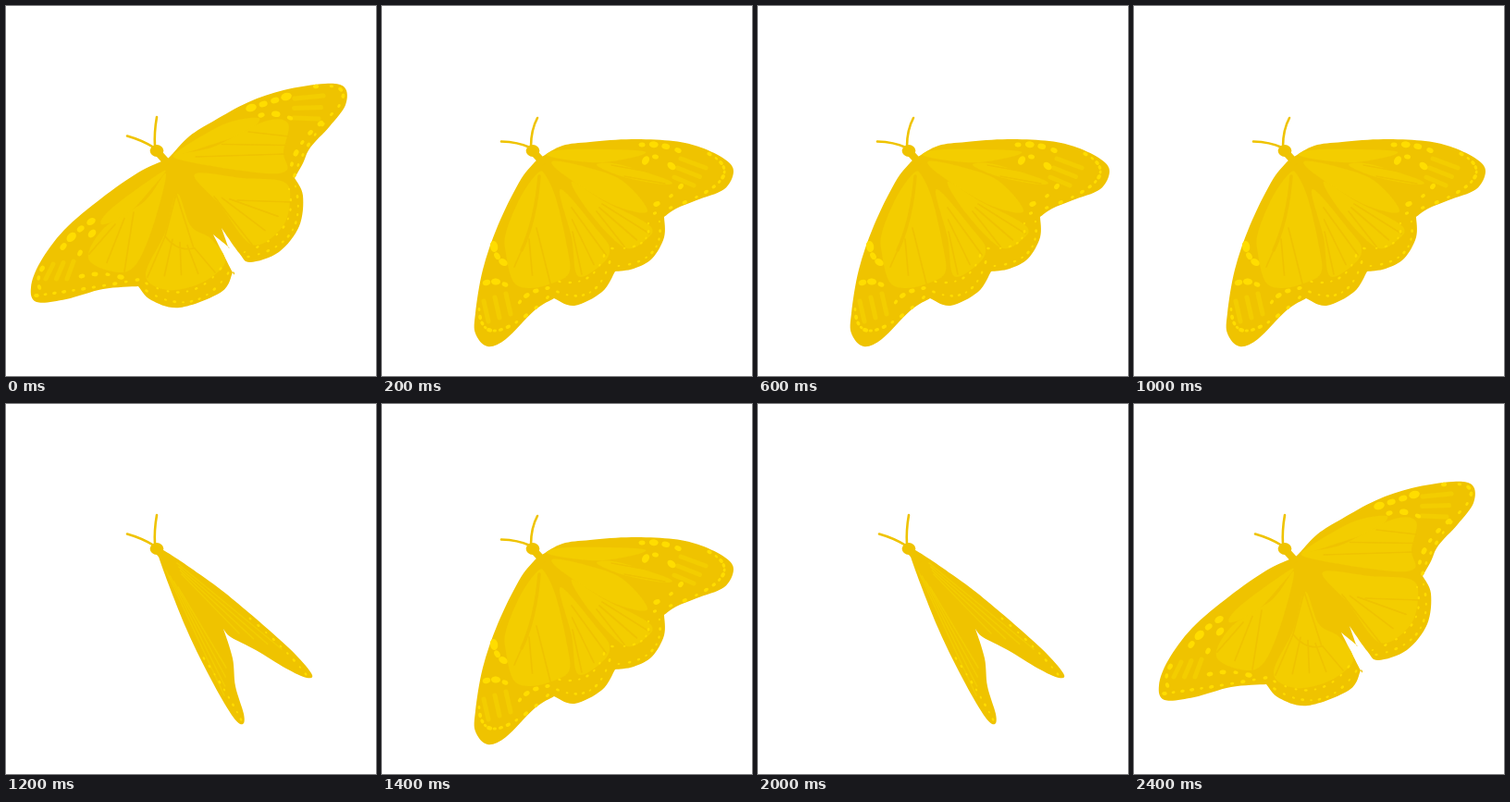
Write an HTML page with a canvas that moves like this. It is 400 by 400 pixels and loops after 2.6 s.

```html
<!DOCTYPE html>
<html lang="en">
<head>
<meta charset="utf-8">
<title>Butterfly</title>
<style>
html, body { margin: 0; width: 100%; height: 100%; overflow: hidden; background: #fff; }
canvas { display: block; width: 400px; height: 400px; }
</style>
</head>
<body>
<canvas id="stage" width="400" height="400"></canvas>
<script>
const ctx = document.getElementById('stage').getContext('2d');
const BASE = '#efc300', CELL = '#f3cd00', SPOT = '#ffdd00';

const points = s => s.trim().split(/\s+/).map(p => p.split(',').map(Number));
const mix = (a, b, t) => [a[0] + (b[0] - a[0]) * t, a[1] + (b[1] - a[1]) * t];

// Smooth closed curve through the points; a doubled point makes a corner.
function blob(s, color = CELL) {
  const p = points(s), n = p.length, at = i => p[(i + n) % n];
  ctx.beginPath();
  ctx.moveTo(...p[0]);
  for (let i = 0; i < n; i++) {
    const [a, b, c, d] = [at(i - 1), at(i), at(i + 1), at(i + 2)];
    ctx.bezierCurveTo(b[0] + (c[0] - a[0]) / 6, b[1] + (c[1] - a[1]) / 6,
      c[0] - (d[0] - b[0]) / 6, c[1] - (d[1] - b[1]) / 6, ...c);
  }
  ctx.fillStyle = color;
  ctx.fill();
}

function stroke(d, width, color = BASE) {
  ctx.strokeStyle = color;
  ctx.lineWidth = width;
  ctx.lineCap = 'round';
  ctx.stroke(new Path2D(d));
}

function oval(x, y, rx, ry, turn, color) {
  ctx.beginPath();
  ctx.ellipse(x, y, rx, ry, turn, 0, 7);
  ctx.fillStyle = color;
  ctx.fill();
}

// n spots of slightly varied size along a curve: start, control, end.
function spots(s, n, r) {
  const [a, b, c] = points(s);
  for (let i = 0; i < n; i++) {
    const t = i / (n - 1), p = mix(a, b, t), q = mix(b, c, t);
    const size = r * (1 + 0.2 * Math.sin(i * 2.4 + a[0]));
    oval(...mix(p, q, t), size, size * 0.7, Math.atan2(q[1] - p[1], q[0] - p[0]), SPOT);
  }
}

// n lines from the segment a-b to the segment c-d.
function fan(s, n, width = 1.7, color = BASE) {
  const [a, b, c, d] = points(s);
  for (let i = 0; i < n; i++) {
    const t = i / (n - 1);
    stroke(`M${mix(a, b, t)}L${mix(c, d, t)}`, width, color);
  }
}

const stripes = s => fan(s, 3, 5, CELL);

function head(feelers) {
  oval(163, 156.5, 7.3, 6.5, 0, BASE);
  stroke('M163 157L173 168', 8);
  stroke(feelers, 2.6);
}
const RAISED = 'M160 153Q147 145 131 140.5M161 152Q160 137 163 120';
const SPREAD = 'M160 153Q147 147 129 146.5M161 152Q161 134 168 121';

function open() {
  blob(`176,164 198,141 225,124 262,104 300,91 345,84 366,88 367,107 350,130 329,153 321,170 312,186
    312,186 321,205 317,238 295,266 264,277 252,267 233,240 233,240 240,260 240,260 224,247 224,247
    245,288 245,288 233,309 188,326 157,318 143,303 143,303 105,306 65,317 33,320 27,304 37,277
    63,242 103,208 143,180 168,168`, BASE);
  // right wing
  blob('181,161 235,128 273,121 262,135 225,149');
  blob('182,164 225,152 279,125 305,127 300,158 303,178 270,180');
  blob('204,182 255,186 300,190 307,210 298,240 266,258 232,216');
  fan('262,136 205,163 306,141 302,160', 3);
  fan('250,210 225,206 308,212 266,258', 4);
  stripes('312,100 311,121 343,97 338,122');
  spots('265,110 285,104 303,98', 4, 5);
  spots('276,118 292,114 307,121', 3, 4);
  spots('335,87 376,83 360,108', 5, 2.6);
  spots('352,117 322,150 312,183', 7, 2.2);
  spots('340,127 316,146 309,171', 5, 3.2);
  spots('313,195 328,258 262,271', 12, 1.7);
  spots('306,198 318,246 258,266', 9, 1.6);
  // left wing
  blob('171,178 115,218 103,236 130,226 155,200');
  blob('173,182 154,252 131,287 90,275 105,241 150,211');
  blob('185,203 200,238 222,252 237,277 212,299 175,307 151,291 172,245');
  fan('138,223 118,236 128,287 90,268', 3);
  fan('172,249 204,262 153,293 226,288', 5);
  stroke('M184 203L172 249Q185 266 203 262Z', 1.7);
  stripes('51,279 73,276 43,295 66,295');
  spots('62,260 74,244 92,233', 4, 5);
  spots('80,267 86,254 93,246', 2, 4.5);
  spots('39,284 33,294 36,304', 3, 3);
  spots('33,313 80,307 142,296', 11, 2.3);
  spots('82,292 103,287 124,293', 4, 3.2);
  spots('152,308 205,340 240,289', 11, 1.7);
  spots('152,300 200,325 232,284', 9, 1.6);
  head(RAISED);
}

function half() {
  blob(`173,163 195,151 225,147 270,144 315,146 345,153 371,166 380,179 370,198 340,210 318,219
    305,228 305,228 305,250 292,273 272,284 252,287 252,287 238,309 208,324 186,316 186,316 165,329
    134,360 114,368 101,354 101,332 109,285 125,238 148,191 164,170`, BASE);
  // right wing
  blob('178,161 200,155 275,156 281,161 240,169 205,167');
  blob('184,168 220,174 260,189 287,222 250,215 200,185');
  blob('232,172 255,171 309,188 306,193 262,185');
  blob('205,190 240,211 289,237 286,252 262,261 225,224');
  fan('248,172 262,184 287,179 306,192', 2, 1.5);
  fan('238,214 232,222 289,246 262,260', 3);
  stripes('323,165 316,185 350,175 337,194');
  spots('281,150 300,148 320,156', 4, 4.4);
  spots('285,167 292,156 313,173', 3, 4.4);
  spots('354,160 405,188 295,224', 13, 2.4);
  spots('323,195 315,206 297,214', 3, 3.2);
  spots('300,233 306,276 256,281', 9, 1.7);
  spots('288,235 292,264 249,262', 7, 1.6);
  // left wing
  blob('168,181 150,206 134,245 134,268 142,298 158,305 180,301 202,289 200,260 188,208 176,182');
  blob('193,198 235,245 246,262 239,278 212,292 205,250');
  stroke('M170 184Q166 232 151 264', 3.5);
  fan('151,264 167,240 143,282 182,300', 3);
  fan('205,218 206,244 242,269 216,290', 3);
  stripes('110,319 134,311 115,341 139,333');
  spots('121,260 123,272 131,277', 3, 5);
  spots('113,299 123,296 133,301', 3, 4.4);
  spots('105,328 108,380 179,315', 12, 2.5);
  spots('149,320 158,308 179,305', 4, 3.2);
  spots('246,277 232,326 190,309', 9, 1.7);
  spots('240,270 228,304 192,298', 7, 1.6);
  head(SPREAD);
}

function closed() {
  blob(`168,157 215,188 250,215 305,263 330,291 325,296 303,286 270,266 243,252 235,243 235,243
    245,275 248,305 257,335 256,346 246,339 224,302 195,243 165,165`, BASE);
  fan('185,172 190,184 298,265 252,248', 4, 1.5, CELL);
  fan('173,180 186,198 236,315 238,285', 4, 1.5, CELL);
  spots('264,232 300,262 324,292', 9, 1.6);
  spots('214,275 238,310 254,341', 9, 1.6);
  head(RAISED);
}

const cycle = [open, half, closed, half];

function frame(now) {
  const step = Math.floor(now % 2600 / 200);
  ctx.fillStyle = '#fff';
  ctx.fillRect(0, 0, 400, 400);
  cycle[step % 4]();
  requestAnimationFrame(frame);
}
frame(0);
</script>
</body>
</html>
```
